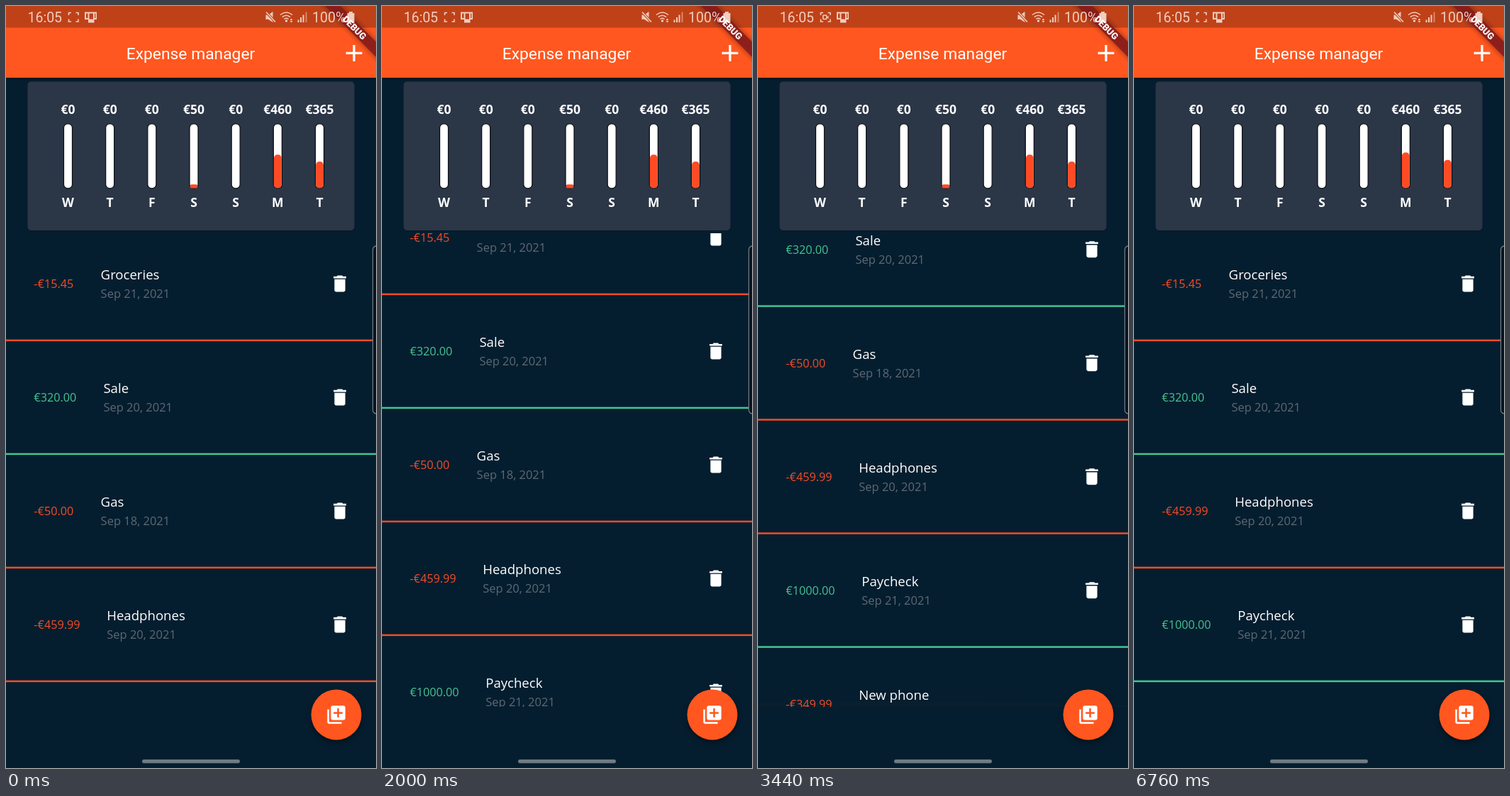
Write an HTML page that moves like this. It is 522 by 1073 pixels and loops after 6800 ms.

```html
<!DOCTYPE html>
<html lang="en">
<head>
<meta charset="utf-8">
<title>Expense manager</title>
<style>
  html, body { margin: 0; width: 100%; height: 100%; overflow: hidden; background: #051e2f; }
  svg { display: block; width: 100%; height: 100%; font-family: "Open Sans", "Noto Sans", sans-serif; }
  .roboto { font-family: Roboto, Arial, sans-serif; }
  .mid { text-anchor: middle; }
  .chart { font-size: 17.5px; font-weight: 700; fill: #fff; text-anchor: middle; }
  .title { font-size: 18.6px; fill: #fff; }
  .date { font-size: 16.5px; fill: #5d6974; }
  .amount { font-size: 16.2px; }
  .line { fill: none; stroke: #f0cdbf; stroke-width: 1.6; }
</style>
</head>
<body>
<svg viewBox="0 0 522 1073" preserveAspectRatio="none">
  <defs>
    <clipPath id="listClip"><rect y="320" width="522" height="667"/></clipPath>
    <linearGradient id="barShade" x2="0" y2="1">
      <stop offset="0" stop-color="#000" stop-opacity=".35"/>
      <stop offset="1" stop-color="#000" stop-opacity="0"/>
    </linearGradient>
    <filter id="soft" x="-40%" y="-40%" width="180%" height="180%"><feGaussianBlur stdDeviation="4"/></filter>
    <path id="bin" fill="#fff" transform="scale(1.269) translate(-12 -12)"
      d="M6 19c0 1.1.9 2 2 2h8c1.1 0 2-.9 2-2V7H6zM19 4h-3.500l-1-1h-5l-1 1H5v2h14z"/>
  </defs>
  <rect width="522" height="1073" fill="#051e2f"/>

  <g clip-path="url(#listClip)">
    <g id="list"></g>
    <ellipse id="lowGlow" cx="180" rx="783" fill="#ff5722"/>
    <ellipse id="topGlow" cx="180" rx="783" fill="#ff5722"/>
  </g>

  <rect x="30.500" y="107.500" width="461" height="209.500" rx="5" fill="#000" opacity=".2"/>
  <rect x="30.500" y="106.500" width="461" height="209.500" rx="5" fill="#2b3647"/>
  <g id="chart"></g>

  <rect y="101" width="522" height="5" fill="url(#barShade)"/>
  <rect width="522" height="101" fill="#ff571f"/>
  <rect width="522" height="30.500" fill="#bf4118"/>
  <text class="roboto mid" x="260.500" y="74.500" font-size="22.830" fill="#fff">Expense manager</text>
  <path fill="#fff" transform="translate(491 66.300) scale(1.620) translate(-12 -12)"
    d="M19 13h-6v6h-2v-6H5v-2h6V5h2v6h6z"/>

  <circle cx="466" cy="1002" r="35" opacity=".45" filter="url(#soft)"/>
  <circle cx="466" cy="998" r="35.500" fill="#ff571f"/>
  <path fill="#fff" transform="translate(466 998) scale(1.269) translate(-12 -12)"
    d="M4 6H2v14c0 1.1.9 2 2 2h14v-2H4zm16-4H8c-1.1 0-2 .9-2 2v12c0 1.1.9 2 2 2h12c1.1 0 2-.9 2-2V4c0-1.1-.9-2-2-2zm-1 9h-4v4h-2v-4H9V9h4V5h2v4h4z"/>

  <g transform="translate(522 0) rotate(45)">
    <rect x="-75" y="35.500" width="150" height="15.200" opacity=".4" filter="url(#soft)"/>
    <rect x="-75" y="35.500" width="150" height="15.200" fill="#8a1b1c" opacity=".85"/>
  </g>

  <g class="roboto" font-size="19.500" fill="#f0cdbf">
    <text x="30.500" y="22.800">16:05</text>
    <text x="432" y="22.800">100%</text>
  </g>
  <path class="line" d="M88.500 13V9.500H92M98.500 9.500H102V13M102 18.500V22H98.500M92 22H88.500V18.500"/>
  <g id="rec">
    <rect class="line" x="91.800" y="13" width="5" height="5.500" rx="1"/>
    <path fill="#f0cdbf" d="M97 15.700l2.500-2v4.500z"/>
  </g>
  <path fill="#f0cdbf" fill-rule="evenodd" d="M111 8.500H128V19H124.500V23.500H116V19H111zM113 10.500V17H115.500V10.500zM117.500 10.500V18.500H123V10.500zM125 10.500V17H126.300V10.500z"/>
  <path fill="#f0cdbf" d="M366.500 12.500H370L376.500 8V23L370 18.800H366.500z"/>
  <path d="M366 7.500L380 22.500" stroke="#bf4118" stroke-width="3.500"/>
  <path class="line" d="M367 8.500L380 22.500"/>
  <path class="line" d="M387 12.500Q395.500 5.500 404 12.500M389.800 15.700Q395.500 10.800 401 15.700M392.500 18.500Q395.500 16 398.500 18.500"/>
  <circle cx="395.500" cy="21" r="1.700" fill="#f0cdbf"/>
  <path fill="#f0cdbf" d="M400.500 20l2-2.500 2 2.500zM400.500 21l2 2.500 2-2.500z"/>
  <path fill="#f0cdbf" d="M411.500 19.500h2v3.500h-2zM415 16h2v7h-2zM418.500 12.500h2v10.500h-2z"/>
  <path fill="#f0cdbf" opacity=".5" d="M422.500 8.500h2v14.500h-2z"/>
  <path fill="#f0cdbf" d="M484 8h5v2h2.500v13.500h-10V10h2.500z"/>
  <text class="roboto mid" transform="translate(522 0) rotate(45)" y="47.700" font-size="12.900" font-weight="900" fill="#fff">DEBUG</text>

  <rect x="517.500" y="338" width="20" height="236" rx="5" fill="#04131e" stroke="#6f7b85" stroke-width="1.300"/>
  <rect x="192" y="1061" width="138" height="5.200" rx="2.600" fill="#707a83"/>
</svg>
<script>
const LOOP = 6800, PITCH = 160, MAX_SCROLL = 285, DELETE_AT = 5400;
const RED = "#f44c27", GREEN = "#45c492";
const $ = id => document.getElementById(id);

function add(parent, tag, attrs, text) {
  const el = document.createElementNS("http://www.w3.org/2000/svg", tag);
  for (const k in attrs) el.setAttribute(k, attrs[k]);
  if (text) el.textContent = text;
  parent.appendChild(el);
  return el;
}

// amount, title, date, left edge of the title
const rows = [
  ["-€15.45", "Groceries", "Sep 21, 2021", 133.6],
  ["€320.00", "Sale", "Sep 20, 2021", 137.4],
  ["-€50.00", "Gas", "Sep 18, 2021", 133.6],
  ["-€459.99", "Headphones", "Sep 20, 2021", 142.2],
  ["€1000.00", "Paycheck", "Sep 21, 2021", 146.2],
  ["-€349.99", "New phone", "Sep 21, 2021", 142.2]
].map(([amount, title, date, x]) => {
  const g = add($("list"), "g", {});
  const fill = amount[0] === "-" ? RED : GREEN;
  add(g, "text", { class: "amount", x: 39.2, y: 6, fill }, amount);
  add(g, "text", { class: "title", x, y: -6 }, title);
  add(g, "text", { class: "date", x, y: 20 }, date);
  add(g, "use", { href: "#bin", x: 471, y: 0 });
  add(g, "rect", { y: 78.6, width: 522, height: 2.5, fill });
  return g;
});

const spent = [0, 0, 0, 50, 0, 460, 365];
const bars = spent.map((_, i) => {
  const x = 87.5 + 59.17 * i, g = $("chart");
  const label = add(g, "text", { class: "chart", x, y: 152.4 });
  add(g, "rect", { x: x - 6, y: 166, width: 12, height: 90.8, rx: 5.5, fill: "#fff", stroke: "#0b0d10", "stroke-width": 1.2 });
  const fill = add(g, "rect", { x: x - 5.4, width: 10.8, fill: "#ff4b24" });
  add(g, "text", { class: "chart", x, y: 283 }, "WTFSSMT"[i]);
  return { label, fill };
});

const ramp = (t, a, b) => Math.min(1, Math.max(0, (t - a) / (b - a)));
const ease = p => (1 - Math.cos(Math.PI * p)) / 2;
const pulse = (t, a, peak, b) => ramp(t, a, peak) * (1 - ramp(t, peak, b));

function setGlow(el, edge, k) {
  el.setAttribute("cy", edge < 500 ? edge - 431 * k + 113 * 0.55 * k : edge + 431 * k - 113 * 0.55 * k);
  el.setAttribute("ry", 431 * k);
  el.setAttribute("opacity", 0.11 * k);
}

function draw(t) {
  const scroll = MAX_SCROLL * (ease(ramp(t, 1700, 2650)) - ease(ramp(t, 3250, 3800)));
  const gone = t >= DELETE_AT;
  rows.forEach((g, i) => {
    const slot = gone && i > 2 ? i - 1 : i;
    g.setAttribute("transform", `translate(0 ${391 + PITCH * slot - scroll})`);
    g.setAttribute("display", gone && i === 2 ? "none" : "inline");
  });

  const values = spent.map((v, i) => gone && i === 3 ? 0 : v);
  const total = values.reduce((a, b) => a + b);
  bars.forEach(({ label, fill }, i) => {
    const h = 90 * values[i] / total;
    label.textContent = "€" + values[i];
    fill.setAttribute("y", 256.5 - h);
    fill.setAttribute("height", h);
    fill.setAttribute("rx", Math.min(5, h / 2));
  });

  setGlow($("lowGlow"), 987, pulse(t, 2650, 3040, 3500));
  setGlow($("topGlow"), 321, pulse(t, 3800, 3960, 4360));
  const blink = t % 1000;
  $("rec").setAttribute("display", blink > 260 && blink < 740 ? "inline" : "none");
}

const start = performance.now();
function tick() {
  draw((performance.now() - start) % LOOP);
  requestAnimationFrame(tick);
}
tick();
</script>
</body>
</html>
```
